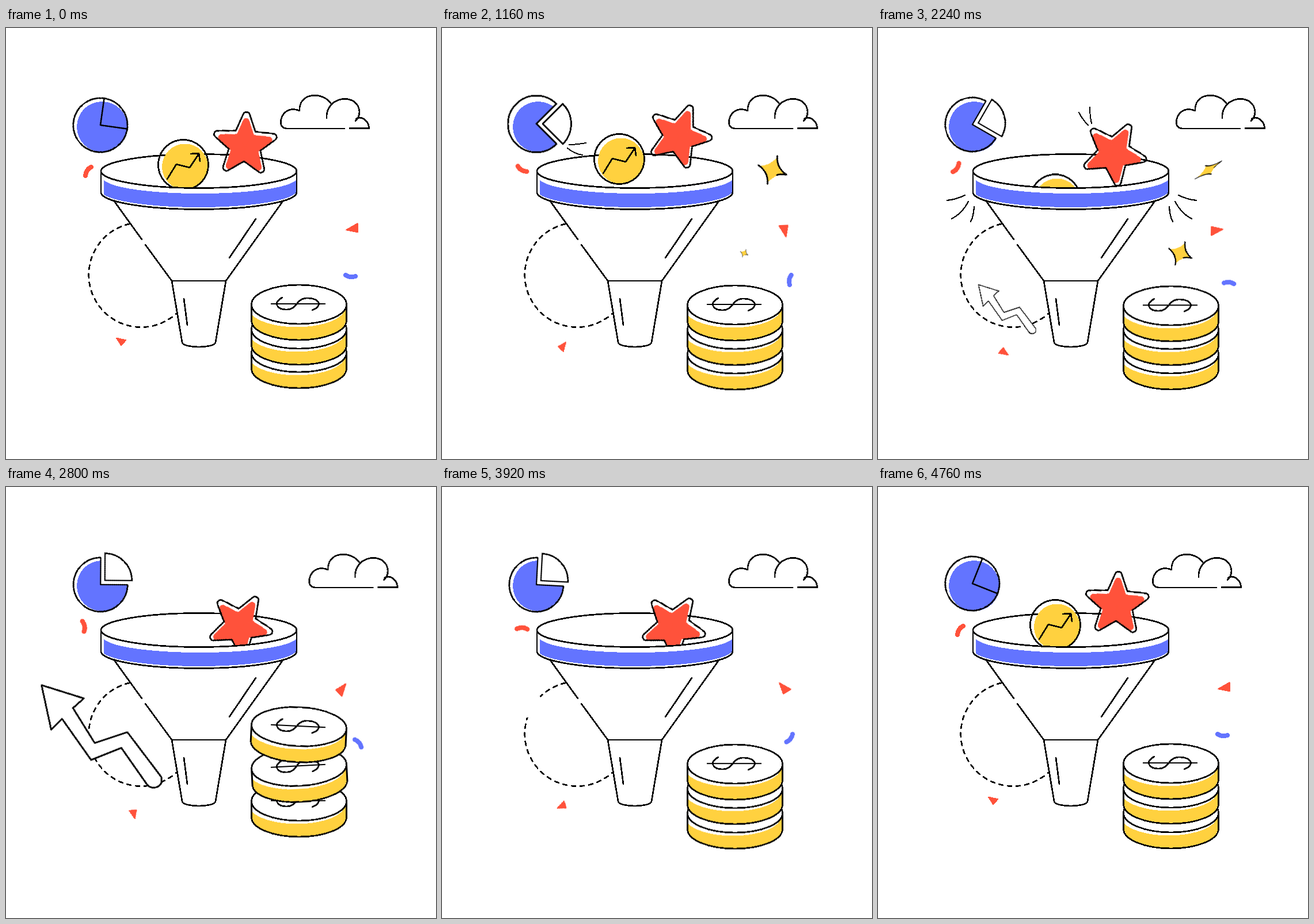
An HTML page without scripts for the animation above (4.8 s loop, 747 by 750 pixels).

```html
<!DOCTYPE html>
<html lang="en">
<head>
<meta charset="utf-8">
<title>Marketing funnel</title>
<style>
html, body { margin: 0; width: 100%; height: 100%; overflow: hidden; background: #fff; }
svg { display: block; width: 100%; height: 100%; shape-rendering: crispEdges; }
svg * { animation: 4800ms linear infinite; }
.line { fill: none; stroke: #000; stroke-width: 2.7; stroke-linecap: round; stroke-linejoin: round; }
.white { fill: #fff; }
.blue { fill: #6374ff; }
.red { fill: #ff523b; }
.yellow { fill: #ffd13f; }
.dash { fill: none; stroke-width: 8; stroke-linecap: round; }

/* cloud and confetti drift out and back */
.drift { animation-name: drift; }
@keyframes drift {
  57.5% { transform: translate(var(--x), var(--y)) rotate(calc(var(--turn) * 220deg)); }
  99.2%, 100% { transform: rotate(calc(var(--turn) * 360deg)); }
}

/* short strokes that draw on and off, starting at --s */
.burst { animation-name: burst; animation-delay: calc(var(--s) - 4800ms); stroke-dasharray: 1 3; stroke-dashoffset: 1.1; }
@keyframes burst {
  0% { stroke-dashoffset: 1.1; }
  2%, 8% { stroke-dashoffset: 0; }
  10%, 100% { stroke-dashoffset: -1.1; }
}

.pie { animation-name: pie; }
@keyframes pie {
  0%, 14% { transform: rotate(-37deg); }
  24.17% { transform: translate(0, -2px) rotate(0deg) scale(1.05); }
  34% { transform: translate(0, -2px) rotate(6deg); }
  46.67% { transform: translate(0, -1px) rotate(-15deg); }
  69.17% { transform: translate(.5px, 2.5px) rotate(-72deg); }
  81.67% { transform: translate(0, 1px) rotate(-42deg); }
  99.17% { transform: translate(0, -1px) rotate(-23deg); }
  100% { transform: rotate(-37deg); }
}
.slice { animation-name: slice; }
@keyframes slice {
  0%, 14%, 92%, 100% { transform: none; }
  21%, 84% { transform: translate(10.5px, 0); }
}
.cut { animation-name: cut; animation-timing-function: step-end; }
@keyframes cut { 0% { opacity: 0; } 15% { opacity: 1; } 91% { opacity: 0; } }

.chart { animation-name: chart; animation-timing-function: ease-in-out; }
@keyframes chart {
  0%, 100% { transform: translate(308px, 238px); }
  10.83% { transform: translate(308px, 222px); }
  24.17% { transform: translate(308px, 228px); }
  36% { transform: translate(308px, 214px); animation-timing-function: ease-in; }
  46.67% { transform: translate(308px, 298px); animation-timing-function: linear; }
  48.5%, 86% { transform: translate(308px, 340px); animation-timing-function: ease-out; }
  91.5% { transform: translate(308px, 190px); }
  99.17% { transform: translate(308px, 240px); }
}

.star { animation-name: star; animation-timing-function: ease-in-out; }
@keyframes star {
  0%, 100% { transform: translate(415px, 203px); }
  5.5% { transform: translate(413px, 191px); }
  10.83% { transform: translate(411px, 202px); }
  24.17% { transform: translate(412px, 188px); }
  34% { transform: translate(412px, 184px); }
  46.67% { transform: translate(410px, 218px); }
  54% { transform: translate(409px, 206px); animation-timing-function: ease-in; }
  64%, 78% { transform: translate(401px, 345px); animation-timing-function: linear; }
  81.67% { transform: translate(402px, 243px); animation-timing-function: ease-out; }
  87.5% { transform: translate(408px, 143px); }
  99.17% { transform: translate(415px, 204px); }
}
.spin { animation-name: spin; }
@keyframes spin {
  0%, 99.17%, 100% { transform: rotate(3deg); }
  10.83% { transform: rotate(24deg); }
  24.17% { transform: rotate(21deg); }
  46.67% { transform: rotate(29deg); }
  81.67% { transform: rotate(33deg); }
}

.drop { animation-name: drop; }
@keyframes drop {
  0%, 67.5% { transform: translate(337px, 500px) scale(.6); }
  69.17% { transform: translate(337px, 600px); }
  72.5%, 75% { transform: translate(337px, 667px); }
  76.5%, 100% { transform: translate(337px, 667px) scale(0); }
}

.arrow { animation-name: arrow; }
@keyframes arrow {
  0%, 44% { transform: scale(0); }
  46.67% { transform: scale(1); }
  51%, 60% { transform: scale(2.1); }
  64%, 67.5% { transform: scale(0); }
  69.17% { transform: scale(.545); }
  73%, 77% { transform: scale(2.1); }
  81%, 100% { transform: scale(0); }
}
.gap { animation-name: gap; stroke-dasharray: 1 3; }
@keyframes gap {
  0%, 62%, 96%, 100% { stroke-dashoffset: 1; }
  69.17% { stroke-dashoffset: .57; }
  81.67%, 84% { stroke-dashoffset: .15; }
}

/* stacked coins hop to height --h, then settle slightly squashed */
.hop { animation: hop 2400ms var(--d) infinite; }
@keyframes hop {
  0%, 4.2% { transform: none; animation-timing-function: cubic-bezier(.33, .67, .67, 1); }
  27.5% { transform: translate(0, calc(var(--h) * -1.07)) rotate(var(--tilt)); animation-timing-function: cubic-bezier(.33, 0, .67, .33); }
  46.5% { transform: none; }
  50%, 64% { transform: translate(0, calc(var(--h) * .015)); }
  80%, 94% { transform: translate(0, calc(var(--h) * .03)); }
  100% { transform: none; }
}

.glint { animation-name: glint; }
@keyframes glint {
  0%, 20% { transform: scale(0); }
  24.17% { transform: rotate(19deg); }
  36% { transform: rotate(5deg) scale(1.1); }
  46.67% { transform: rotate(-34deg) scale(1.07, .35); }
  49%, 100% { transform: rotate(-40deg) scale(0); }
}
.glint2 { animation-name: glint2; }
@keyframes glint2 {
  0%, 22.5% { transform: scale(0); }
  24.17% { transform: rotate(25deg) scale(.28); }
  34% { transform: rotate(10deg) scale(.9); }
  46.67% { transform: rotate(23deg) scale(.83); }
  55%, 100% { transform: rotate(60deg) scale(0); }
}
</style>
</head>
<body>
<svg viewBox="0 0 747 750">
  <defs>
    <clipPath id="mouth"><path d="M0 0H747V249H505A170 29.5 0 0 1 165 249H0Z"/></clipPath>
    <clipPath id="below"><path d="M0 548H747V750H0Z"/></clipPath>
    <path id="arm" d="M-17 -23.5L-5.6 -53A6 6 0 0 1 5.6 -53L17 -23.5"/>
    <path id="wedge" d="M0 0L-17 -23.5L-5.6 -53A6 6 0 0 1 5.6 -53L17 -23.5Z"/>
    <g id="starLine">
      <use href="#arm"/><use href="#arm" transform="rotate(72)"/><use href="#arm" transform="rotate(144)"/>
      <use href="#arm" transform="rotate(216)"/><use href="#arm" transform="rotate(288)"/>
    </g>
    <g id="starFill">
      <use href="#wedge"/><use href="#wedge" transform="rotate(72)"/><use href="#wedge" transform="rotate(144)"/>
      <use href="#wedge" transform="rotate(216)"/><use href="#wedge" transform="rotate(288)"/>
    </g>
    <g id="disc">
      <path class="line white" d="M-82.5 0V28A82.5 34 0 0 0 82.5 28V0"/>
      <path class="yellow" d="M-81 19A84 34 0 0 0 79 11L81 9V28A81 33 0 0 1 -81 28Z"/>
      <path class="line" d="M-82.5 0V28A82.5 34 0 0 0 82.5 28V0"/>
      <ellipse class="line white" rx="82.5" ry="34"/>
      <path class="line" d="M-48 -1H45M-29 -12C-46 -3 -38 9 -22 9C-2 9 -6 -11 15 -11C36 -11 42 3 23 10"/>
    </g>
    <g id="dollar">
      <circle class="line white" r="43.5"/>
      <circle class="yellow" cx="1" cy="1" r="40"/>
      <path class="line" d="M11 -9C8 -19 -10 -19 -10 -9C-10 0 11 -1 11 8C11 18 -8 19 -11 9M0 -22V22"/>
    </g>
    <g id="rays">
      <path pathLength="1" d="M151 291Q137 298 120 300"/>
      <path pathLength="1" d="M157 302Q146 323 128 332"/>
      <path pathLength="1" d="M167 311Q166 328 161 337"/>
    </g>
    <g id="allRays"><use href="#rays"/><use href="#rays" transform="translate(673) scale(-1 1)"/></g>
    <g id="whoosh">
      <path pathLength="1" d="M-66 -66Q-60 -54 -50 -44"/>
      <path pathLength="1" d="M-47 -75Q-47 -60 -44 -47"/>
    </g>
    <g id="sparkle">
      <path class="yellow" d="M0 -22Q6 -7 22 0Q7 6 0 22Q-6 7 -22 0Q-7 -6 0 -22Z"/>
      <path class="line" d="M0 -26Q5 -6 26 0Q15 2 10 6M0 26Q-5 6 -26 0"/>
    </g>
  </defs>

  <!-- cloud -->
  <path class="line drift" style="--x:50.5px;--y:0px;--turn:0" d="M588 175H488C478 174.5 476 167 478 158C483 141 499 139 510 144C508 112 550 110 564 131M557 157C555 117 612 112 614 146C614 153 611 158 607 162M608 158C618 152 630.5 162 630.5 174.5H597"/>

  <!-- confetti -->
  <g transform="translate(142 249)"><path class="dash drift" stroke="#ff523b" style="--x:-7px;--y:-7px;--turn:-1" d="M-4 8Q-3 -3 6 -7"/></g>
  <g transform="translate(598 432)"><path class="dash drift" stroke="#6374ff" style="--x:15px;--y:14px;--turn:1" d="M-8 -2Q0 3 9 0"/></g>
  <g transform="translate(604 349)"><path class="red drift" style="--x:-22px;--y:4px;--turn:-1" d="M-14 2.5L7 -9.5L8 7Z" stroke="#ff523b" stroke-linejoin="round"/></g>
  <g transform="translate(200 545)"><path class="red drift" style="--x:22px;--y:23px;--turn:1" d="M-9 -6L9 -2L0 8Z" stroke="#ff523b" stroke-linejoin="round"/></g>

  <!-- sparkles -->
  <g transform="translate(574 247)"><use class="glint" href="#sparkle"/></g>
  <g transform="translate(525 392)"><use class="glint2" href="#sparkle"/></g>

  <!-- pie chart -->
  <g transform="translate(164 169)">
    <circle class="blue" cx="3" cy="3" r="44"/>
    <g class="pie">
      <path class="white cut" d="M0 0L36 -36A51 51 0 0 1 36 36Z"/>
      <path class="line" d="M0 0L33.2 -33.2A47 47 0 1 0 33.2 33.2Z"/>
      <path class="line slice" d="M0 0L33.2 -33.2A47 47 0 0 1 33.2 33.2Z"/>
    </g>
  </g>
  <g class="line burst" style="--s:1000ms;stroke-width:2">
    <path pathLength="1" d="M221 203Q236 203 250 200"/>
    <path pathLength="1" d="M218 209Q230 219 244 221"/>
  </g>

  <!-- dashed ring and arrow -->
  <path class="line" d="M214 341A91 91 0 1 0 297 496" stroke-dasharray="7 8"/>
  <path class="gap" pathLength="1" fill="none" stroke="#fff" stroke-width="6" d="M170 364A91 91 0 0 0 145 408"/>
  <g transform="translate(278 540)">
    <g class="arrow">
      <path class="line white" transform="translate(-6 -7)" style="stroke-width:1.4" d="M-97 -86L-62 -75L-71 -67L-53 -38L-26 -47L2 -10Q4 -2 -4 -1Q-8 -1 -10 -4L-31 -34L-56 -24L-80 -58L-89 -49Z"/>
    </g>
  </g>

  <!-- coins falling out -->
  <g clip-path="url(#below)">
    <use class="drop" href="#dollar" style="animation-delay:-960ms"/>
    <use class="drop" href="#dollar"/>
  </g>

  <!-- funnel -->
  <path class="white" d="M187 300L288 440L306 547Q307 554 335 555Q363 554 364 547L382 440L482 300Z"/>
  <path class="line" d="M187 300L236 368M242 377L288 440H382L482 300M288 440L306 547Q307 554 335 555Q363 554 364 547L382 440M434 332L388 400M309 471L315 517"/>
  <path class="white" d="M165 249V286A170 29.5 0 0 0 505 286V249Z"/>
  <path class="blue" d="M170 264A168 27 0 0 0 504 264V286A170 29 0 0 1 170 290Z"/>
  <ellipse class="line white" cx="335" cy="249" rx="170" ry="29.5"/>
  <path class="line" d="M165 249V286A170 29.5 0 0 0 505 286V249"/>

  <g clip-path="url(#mouth)">
    <g class="chart">
      <circle class="yellow" cx="3" cy="3.5" r="40"/>
      <circle class="line" r="43.5"/>
      <path class="line" d="M-28 25L-12 -1L11 5L27 -19M13 -19L27 -20L29 -6"/>
    </g>
    <g class="star">
      <g class="spin">
        <use class="red" href="#starFill" transform="translate(0 3) scale(.86)" stroke="#ff523b"/>
        <use class="line" href="#starLine"/>
      </g>
      <use class="line burst" href="#whoosh" style="--s:400ms;stroke-width:2"/>
      <use class="line burst" href="#whoosh" transform="translate(5 -5)" style="--s:2100ms;stroke-width:2"/>
    </g>
  </g>
  <path class="line" d="M165 249A170 29.5 0 0 0 505 249"/>

  <use class="line burst" href="#allRays" style="--s:2100ms;stroke-width:2.2"/>
  <use class="line burst" href="#allRays" style="--s:3060ms;stroke-width:2.2"/>

  <!-- coin stack -->
  <g transform="translate(509 567)"><use class="hop" href="#disc" style="--h:20px;--tilt:0deg;--d:-130ms"/></g>
  <g transform="translate(509 524)"><use class="hop" href="#disc" style="--h:41px;--tilt:-3.5deg;--d:-50ms"/></g>
  <g transform="translate(509 481)"><use class="hop" href="#disc" style="--h:76px;--tilt:3.5deg;--d:0ms"/></g>
</svg>
</body>
</html>
```
